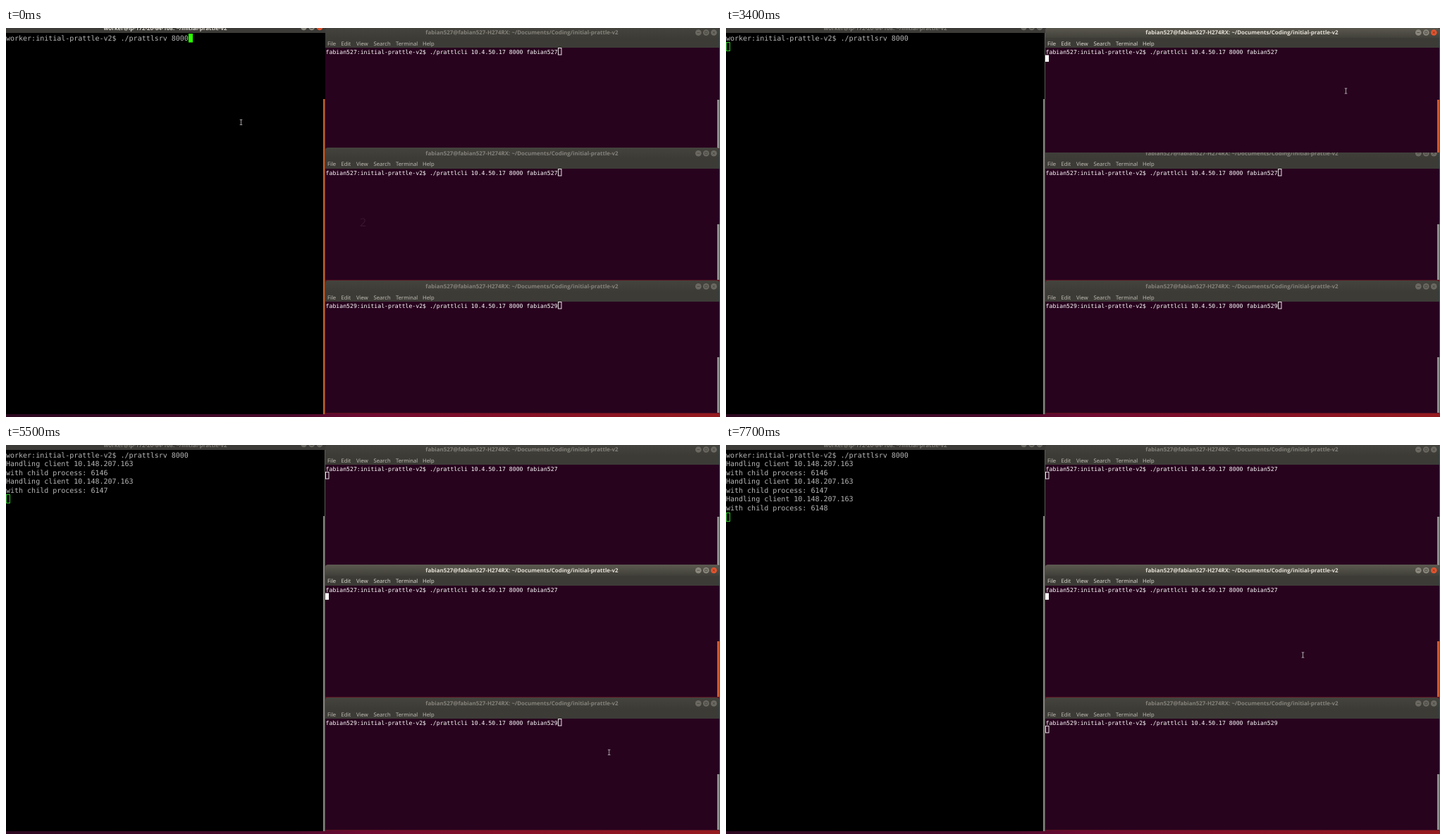
Recreate the animation shown at these times as an HTML page with a canvas. Size 1013 by 553 pixels, loop 8000 ms.

```html
<!DOCTYPE html>
<html lang="en">
<head>
<meta charset="utf-8">
<title>Terminals</title>
<style>
html, body { margin: 0; width: 100%; height: 100%; overflow: hidden; background: #000; }
canvas { display: block; width: 1013px; height: 553px; }
</style>
</head>
<body>
<canvas id="stage" width="1013" height="553"></canvas>
<script>
const ctx = document.getElementById('stage').getContext('2d');
const LOOP = 8000, STEP = 100;
const LEFT = 453, WIDE = 559;
const MONO = '"DejaVu Sans Mono", monospace';
const SANS = '"Open Sans", "Noto Sans", sans-serif';
const PROJECT = 'initial-prattle-v2';
const TITLE = `fabian527@fabian527-H274RX: ~/Documents/Coding/${PROJECT}`;
const MENU = [['File', 456], ['Edit', 475.5], ['View', 497], ['Search', 521.5], ['Terminal', 553], ['Help', 591]];

// enter: command sent, focus: keyboard focus spans, active: highlighted title spans, off: cursor blinked out
const panes = [
  { y: -1, base: 0, end: 171, bar: 102, user: 'fabian527', enter: 3100,
    focus: [[2300, 3900]], active: [[2300, 4000]], off: [2800, 3100] },
  { y: 170, base: 171.7, end: 358, bar: 279, user: 'fabian527', enter: 5000,
    focus: [[3900, 5600], [7700, LOOP]], active: [[4000, 5700], [7700, LOOP]], off: [4500, 4700] },
  { y: 359, base: 360.9, end: 547, bar: 468, user: 'fabian529', enter: 6500,
    focus: [[5600, 7700]], active: [[5700, 7700]], off: [6200, 6300] }
];
const replies = [4200, 5400, 7000];

const inside = (t, [a, b]) => t >= a && t < b;
const within = (t, spans) => spans.some(s => inside(t, s));

function rect(x, y, w, h, fill) {
  ctx.fillStyle = fill;
  ctx.fillRect(x, y, w, h);
}

function frame(x, y, w, h, color) {
  ctx.strokeStyle = color;
  ctx.lineWidth = 1;
  ctx.strokeRect(x + 0.5, y + 0.5, w - 1, h - 1);
}

function text(str, x, y, font, color, align = 'left') {
  ctx.font = font;
  ctx.textAlign = align;
  ctx.fillStyle = color;
  ctx.fillText(str, x, y);
}

function buttons(xs, y, active) {
  xs.forEach((x, i) => {
    const close = i === 2;
    ctx.beginPath();
    ctx.arc(x, y, 4.3, 0, Math.PI * 2);
    ctx.fillStyle = active ? (close ? '#e2542f' : '#8b887e') : '#6b6962';
    ctx.fill();
    ctx.strokeStyle = active && close ? '#7d2a14' : '#3c3b36';
    ctx.lineWidth = 0.7;
    ctx.beginPath();
    if (i === 0) {
      ctx.moveTo(x - 2, y); ctx.lineTo(x + 2, y);
    } else if (i === 1) {
      ctx.rect(x - 1.6, y - 1.6, 3.2, 3.2);
    } else {
      ctx.moveTo(x - 1.5, y - 1.5); ctx.lineTo(x + 1.5, y + 1.5);
      ctx.moveTo(x + 1.5, y - 1.5); ctx.lineTo(x - 1.5, y + 1.5);
    }
    ctx.stroke();
  });
}

function wallpaper() {
  const g = ctx.createLinearGradient(0, 0, 1013, 0);
  g.addColorStop(0, '#2c0820');
  g.addColorStop(0.4, '#4b0a2c');
  g.addColorStop(0.5, '#700a32');
  g.addColorStop(0.7, '#851028');
  g.addColorStop(1, '#961a1e');
  rect(0, 0, 1013, 553, g);
  rect(LEFT, 0, WIDE, 548, '#5e1420');
  rect(1012, 0, 1, 548, '#a5381f');
}

function server(t) {
  const active = t < 2300;
  rect(0, 0, LEFT, 549, '#000');
  rect(0, 0, LEFT, 7, '#3c3b37');
  text(`worker@ip-172-20-64-108: ~/${PROJECT}`, 226, 2.6, `bold 7.95px ${SANS}`, active ? '#dfdbd2' : '#807d76', 'center');
  buttons([422.5, 433.7, 445], -1, active);
  if (!active) rect(452, 7, 1, 94, '#5c5a57');
  rect(450, 101, 2.6, 448, active ? '#c2602f' : '#85827f');

  const lines = [`worker:${PROJECT}$ ./prattlsrv 8000`];
  replies.forEach((at, i) => {
    if (t >= at) lines.push('Handling client 10.148.207.163', `with child process: ${6146 + i}`);
  });
  lines.forEach((line, i) => text(line, 0, 17.6 + i * 12.57, `10px ${MONO}`, '#b6b6b6'));

  const sent = t >= 1400;
  const row = sent ? lines.length : 0;
  const y = Math.round(7.6 + row * 12.57);
  if (active) rect(sent ? 0 : 259, y, 6, 12.5, '#2bff00');
  else frame(0, y, 6, 13, '#2fc42a');
}

function titleBar(p, active) {
  const g = ctx.createLinearGradient(0, p.y, 0, p.y + 16);
  g.addColorStop(0, active ? '#5c5a50' : '#44433d');
  g.addColorStop(1, active ? '#403f39' : '#3c3b36');
  ctx.fillStyle = g;
  ctx.beginPath();
  ctx.roundRect(LEFT, p.y, WIDE, 17, [4, 4, 0, 0]);
  ctx.fill();
  text(TITLE, 732, p.base + 9.4, `bold 7.95px ${SANS}`, active ? '#e4e0d7' : '#85827b', 'center');
  buttons([982.3, 993.3, 1004.3], p.base + 6.5, active);
}

function client(p, t) {
  const focus = within(t, p.focus), active = within(t, p.active);
  const raised = p === panes[0] && inside(t, [2300, 3900]);
  const end = raised ? 177 : p.end;
  titleBar(p, active);
  rect(LEFT, Math.round(p.base + 14.3), WIDE, 14, '#3c3b36');
  for (const [label, x] of MENU) text(label, x, p.base + 24.6, `7.7px ${SANS}`, active ? '#e6e2d9' : '#c6c2b9');
  const top = Math.round(p.base + 28);
  rect(LEFT, top, WIDE, end - top, '#28031e');
  rect(1009, p.bar, 3, end - p.bar, active ? '#d2582c' : '#918d89');
  text(`${p.user}:${PROJECT}$ ./prattlcli 10.4.50.17 8000 ${p.user}`, 453.6, p.base + 36.9, `8.17px ${MONO}`, '#fff');

  const sent = t >= p.enter;
  const x = sent ? LEFT : 783, y = top + (sent ? 10 : 0);
  if (!focus) frame(x, y, 5.5, 10.5, '#e8e2e6');
  else if (!inside(t, p.off)) rect(x, y + 0.5, 5, 9.5, '#fff');
}

// eased travel between two resting points
function glide(t, from, to, a, b) {
  let k = Math.min(1, Math.max(0, (t - from) / (to - from)));
  k = k * k * (3 - 2 * k);
  return [a[0] + (b[0] - a[0]) * k, a[1] + (b[1] - a[1]) * k];
}

function pointer(t) {
  if (within(t, [[3100, 3400], [4700, 5200], [6300, 6800]])) return;
  const first = [879.5, 89.5], second = [881, 266], third = [851, 468.5], last = [818.5, 298.5];
  const [x, y] = t < 1800 ? [333.5, 134]
    : t < 2100 ? [391.5, 126.5]
    : t < 4700 ? glide(t, 3400, 3800, first, second)
    : t < 6300 ? glide(t, 5200, 5600, second, third)
    : glide(t, 6800, 7400, third, last);
  ctx.strokeStyle = '#b4b0b3';
  ctx.lineWidth = 0.9;
  ctx.beginPath();
  ctx.moveTo(x - 1.8, y - 3.6); ctx.lineTo(x + 1.8, y - 3.6);
  ctx.moveTo(x, y - 3.6); ctx.lineTo(x, y + 3.6);
  ctx.moveTo(x - 1.8, y + 3.6); ctx.lineTo(x + 1.8, y + 3.6);
  ctx.stroke();
}

function draw(t) {
  ctx.textBaseline = 'alphabetic';
  ctx.textRendering = 'geometricPrecision';
  wallpaper();
  server(t);
  client(panes[2], t);
  const raised = inside(t, [2300, 3900]);
  client(panes[raised ? 1 : 0], t);
  client(panes[raised ? 0 : 1], t);
  if (t < 1000) text('2', 506.5, 282, `16px ${SANS}`, '#3a1630', 'center');
  pointer(t);
}

const start = performance.now();
function tick() {
  const t = (performance.now() - start) % LOOP;
  draw(Math.floor(t / STEP) * STEP);
  requestAnimationFrame(tick);
}
tick();
</script>
</body>
</html>
```
